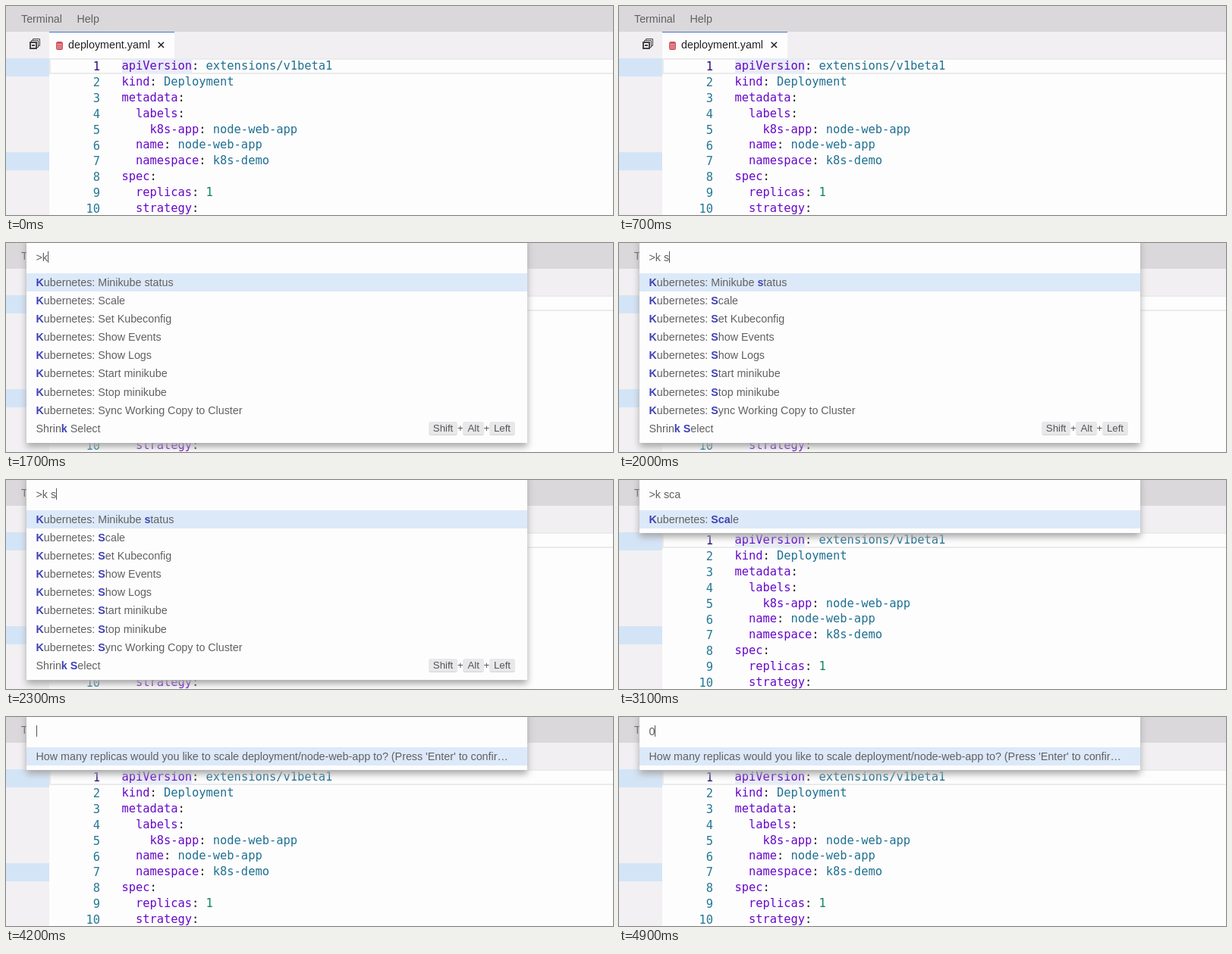
Animation of 800 by 276 pixels, one loop 5000 ms. Source, as an HTML page:

```html
<!DOCTYPE html>
<html lang="en">
<head>
<meta charset="utf-8">
<style>
html, body { margin: 0; width: 800px; height: 276px; overflow: hidden; }
body { position: relative; background: #fefdfe; color: #616161;
  font: 14.29px/24.18px "Liberation Sans", Arial, sans-serif; }
div, svg, pre { position: absolute; margin: 0; white-space: pre; }
#menu { top: 0; width: 800px; height: 34px; background: #dad8da; }
#menu div { top: 4.8px; }
#tabs { top: 33.5px; width: 800px; height: 35.5px; background: #f1eff1; }
#side { top: 69px; width: 57px; height: 207px; background: #f2f0f2; }
#side div { top: 0; width: 57px; height: 24px; background: #d4e4f7; }
#tab { left: 57px; top: 0; width: 165px; height: 35.5px; background: #fefdfe; color: #222;
  border-top: 1.5px solid #4673cb; box-sizing: border-box; }
#line { left: 57px; top: 69px; width: 760px; height: 21px; box-sizing: border-box;
  border: 2px solid #ebebeb; }
#word { left: 152.5px; top: 69px; width: 92.6px; height: 21px; background: #e8edf5; }
pre { top: 68.95px; font: 15.38px/20.89px "DejaVu Sans Mono", monospace; color: #222; }
#numbers { right: 676px; top: 70.1px; text-align: right; color: #237893; }
#numbers b { font-weight: normal; color: #2c0f78; }
#code { left: 152.5px; }
#code b { font-weight: normal; color: #6608c8; }
#code i { font-style: normal; color: #1e7090; }
#code u { text-decoration: none; color: #098658; }
#palette { left: 27px; top: -10px; width: 660px; padding: 49.5px 0 6.6px; background: #fefdfe;
  box-shadow: 0 5.5px 8.8px #a8a8a8; }
#palette div { position: relative; height: 24.18px; padding-left: 12.5px; }
#palette div:first-child { background: #dce9f9; }
#palette b { color: #3f42b5; }
#input { left: 39.5px; top: 6.5px; }
#input.on::after { content: ""; position: absolute; left: 100%; top: 4.5px; width: 1px; height: 15px;
  background: #555; }
.keys { position: absolute; right: 16px; top: 0; margin: 0; display: flex; align-items: center;
  height: 24.18px; font-size: 13.19px; color: #555; }
.keys kbd { font: inherit; line-height: 17px; padding: 0 6px; height: 18.5px; box-sizing: border-box;
  background: #e8e8ea; border-bottom: 1px solid #d4d4d6; border-radius: 3px; }
.keys span { width: 7.2px; display: flex; justify-content: center; }
.keys em { width: 2px; }
</style>
</head>
<body>
<div id="menu"><div style="left:20px">Terminal</div><div style="left:93.5px">Help</div></div>
<div id="tabs">
  <svg style="left:30px;top:8.5px" width="16" height="16" fill="none" stroke="#444">
    <path d="M5.5 3V1.5H14.5V10.5H13M3.5 5V3.5H12.5V12.5H11"/>
    <path d="M2 6H10V14H2Z M4 10H8" stroke-width="2"/>
  </svg>
  <div id="tab">
    <svg style="left:9px;top:12px" width="9" height="11" fill="#d0505c">
      <rect width="9" height="11" rx="2.5"/>
      <path d="M1 3.6H8M1 6H8M1 8.4H8" stroke="#f6d3d6" stroke-width=".8"/>
    </svg>
    <div style="left:25px;top:4.9px">deployment.yaml</div>
    <svg style="left:143px;top:12.5px" width="9" height="9" stroke="#222" stroke-width="1.5"><path d="M.7 .7L8 8M8 .7L.7 8"/></svg>
  </div>
</div>
<div id="side"><div></div><div style="top:124px"></div></div>
<div id="line"></div>
<div id="word"></div>
<pre id="numbers"></pre>
<pre id="code"></pre>
<div id="palette"></div>
<div id="input"></div>
<script>
const $ = id => document.getElementById(id);

const yaml = `apiVersion: extensions/v1beta1
kind: Deployment
metadata:
  labels:
    k8s-app: node-web-app
  name: node-web-app
  namespace: k8s-demo
spec:
  replicas: 1
  strategy:`;
$('code').innerHTML = yaml.replace(/([\w-]+):(?: (.+))?/g, (_, key, value) =>
  `<b>${key}</b>:` + (value ? (isNaN(value) ? ` <i>${value}</i>` : ` <u>${value}</u>`) : ''));
$('numbers').innerHTML = yaml.split('\n').map((_, i) => i ? i + 1 : '<b>1</b>').join('\n');

const commands = `About
Add Cursor Above|Ctrl+Shift+Up
Add Cursor Below|Ctrl+Shift+Down
Add Cursors to Line Ends|Shift+Alt+I
Add Line Comment|Ctrl+K Ctrl+C
Add Selection To Next Find Match|Ctrl+D
Add Selection To Previous Find Match
C/C++: Start Language Server
C/C++: Change Build Configuration
C/C++: Create New Build Configuration
Kubernetes: Minikube status
Kubernetes: Scale
Kubernetes: Set Kubeconfig
Kubernetes: Show Events
Kubernetes: Show Logs
Kubernetes: Start minikube
Kubernetes: Stop minikube
Kubernetes: Sync Working Copy to Cluster
Shrink Select|Shift+Alt+Left`.split('\n').map(row => row.split('|'));

const prompt = "How many replicas would you like to scale deployment/node-web-app to? (Press 'Enter' to confir…";

// Time in ms and the content of the input box
const steps = [[0, null], [900, '>'], [1700, '>k'], [1800, '>k '], [1900, '>k s'],
  [2400, '>k sc'], [2600, '>k sca'], [3800, ''], [4500, '0']];

const keys = (combo = '') => '<p class="keys">' + combo.replace(/\w+|\+| /g, s =>
  s === '+' ? '<span>+</span>' : s === ' ' ? '<em></em>' : `<kbd>${s}</kbd>`) + '</p>';

function rows(text) {
  if (text[0] !== '>') return `<div>${prompt}</div>`;
  const [first, second = ''] = text.slice(1).split(' ');
  const match = new RegExp(`(${first})(.*? )(${second})`, 'i');
  return commands.filter(([name]) => !first || match.test(name))
    .map(([name, combo]) => `<div>${first ? name.replace(match, '<b>$1</b>$2<b>$3</b>') : name}${keys(combo)}</div>`)
    .join('');
}

let shown;
function draw(now) {
  const t = now % 5000;
  const step = steps.findLast(([start]) => start <= t);
  const [start, text] = step;
  if (step !== shown) {
    shown = step;
    $('palette').hidden = $('input').hidden = text === null;
    $('palette').innerHTML = text === null ? '' : rows(text);
    $('input').textContent = text;
  }
  $('input').className = (t - start) % 1000 < 500 ? 'on' : '';
  requestAnimationFrame(draw);
}
draw(0);
</script>
</body>
</html>
```
